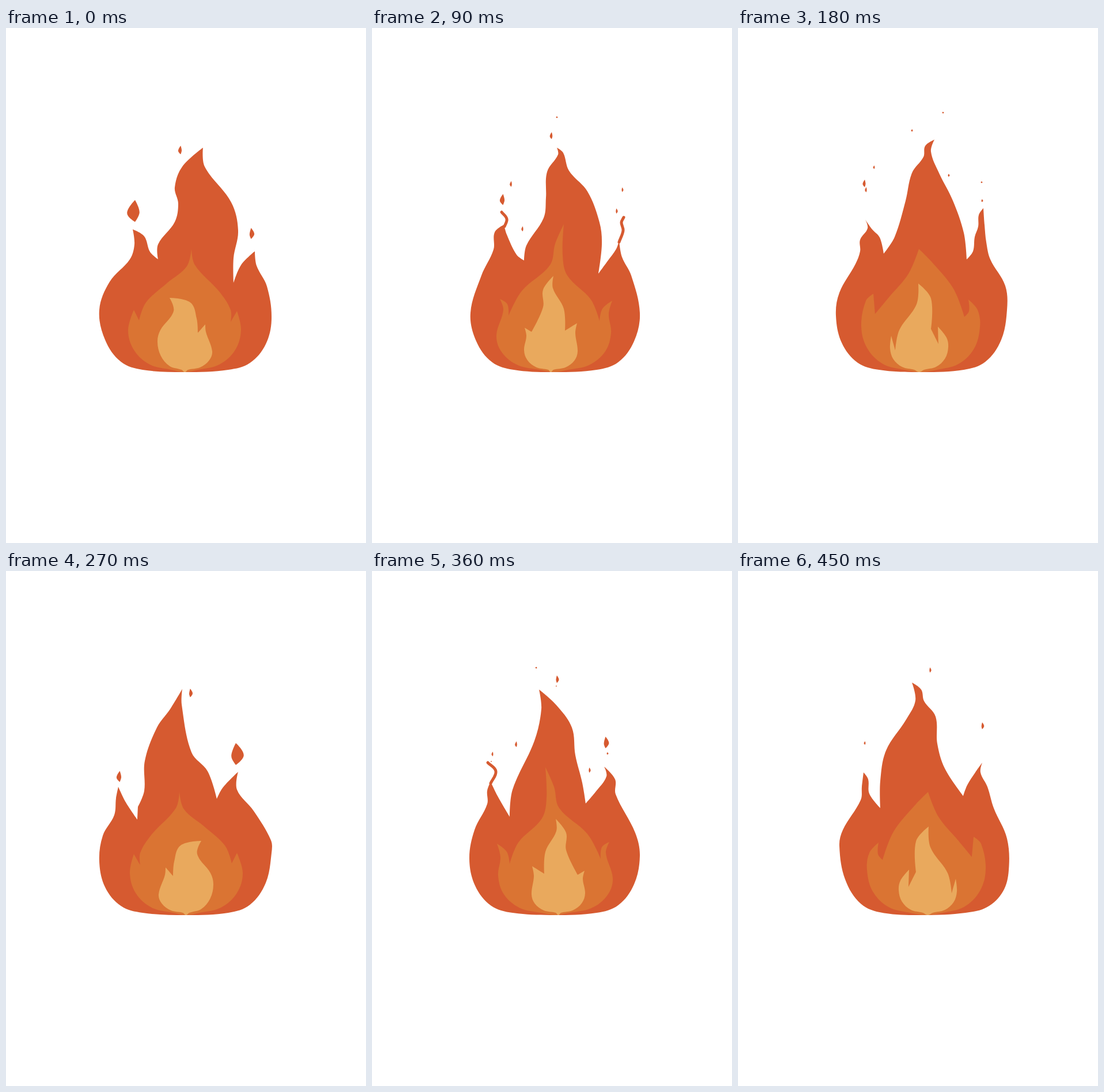
An HTML page that plays this animation: 625 by 895 pixels, repeating every 540 ms.

```html
<!DOCTYPE html>
<html lang="en">
<head>
<meta charset="utf-8">
<title>Flame</title>
<style>
html, body { margin: 0; width: 100%; height: 100%; overflow: hidden; background: #fff; }
svg { display: block; width: 100%; height: 100%; }
</style>
</head>
<body>
<svg id="stage" viewBox="0 0 625 895"></svg>
<script>
const STEP = 90;
const CENTER = 312;
const RED = '#d65a30', ORANGE = '#da7433', GOLD = '#e9a95d';

// Key points run from the left belly over the tongues to the right belly;
// * marks a sharp tip or notch. The round base is computed by bowl().
// Inner flames come back mirrored about axis / 2 after half a loop.
const inner = [
  {
    axis: 623,
    mid: '212,525 222,490* 231,508* 243,477 280,443 314,414 322,383* 328,412 371,459 390,490 390,511* 401,492* 408,525',
    core: '263,545 268,525 291,492 284,469* 320,477 331,505 333,530* 346,515* 347,528 358,562'
  },
  {
    axis: 634,
    mid: '216,535 228,490 222,471* 235,480 237,500* 260,457 309,412 318,375 333,341* 331,395 339,430 380,472 395,509* 400,488 417,474* 411,497 415,530',
    core: '264,560 268,535 265,521* 277,528* 297,485 297,455 315,431* 314,452 333,488 335,526* 356,513* 353,530 357,562'
  },
  {
    axis: 644,
    mid: '214,518 222,474 235,462* 238,497* 262,468 296,427 314,384* 335,405 374,453 393,502* 401,492 400,472* 416,490 420,520',
    core: '264,557 266,535* 273,560* 280,525 310,480 313,444* 335,470 335,523* 348,549* 347,519* 362,538 365,555'
  }
];

// Sparks are x, y, height; wisps are thin curls.
const poses = [
  {
    outer: '162,490 180,441 215,402 223,376 220,350* 240,362 250,389 264,402* 264,376 293,337 299,305 293,277 306,241 342,208* 345,241 391,303 403,352 395,400 395,443* 408,412 432,388* 435,413 453,449 461,505',
    sparks: '221,318,38 302,212,15 427,357,19'
  },
  {
    outer: '171,495 190,430 211,385 213,355 229,342* 234,359 251,394 264,404* 268,378 298,330 302,295 304,250 323,220 321,208* 332,217 342,248 374,284 395,338 399,376 393,427* 409,405 424,384 429,369* 434,398 450,430 465,495',
    sparks: '321,155,3 311,187,12 226,298,19 241,271,10 261,349,9 425,318,9 435,281,8',
    wisps: '230,345 234,332 225,320|429,372 436,352 433,338 437,329'
  },
  {
    outer: '170,500 176,460 204,410 212,388 212,368 225,348 221,333* 233,350 246,364 253,392* 272,363 291,300 302,252 322,224 325,205 341,194* 335,215 349,252 373,300 392,356 397,402* 408,388 411,363 417,345 418,325 426,313* 428,342 431,372 438,402 464,448 467,490',
    sparks: '356,147,3 302,178,4 236,242,6 219,270,13 222,281,9 366,256,5 423,268,3 424,300,5'
  },
  {
    outer: '162,505 168,460 188,424 191,395 195,375* 208,402 228,432* 229,410* 240,382 241,330 262,272 285,240 306,205* 305,232 322,315 350,348 366,396* 376,377 403,349* 401,380 430,417 460,468 461,490',
    sparks: '402,318,38 321,212,15 196,357,19'
  },
  {
    outer: '169,500 178,450 200,405 200,382 206,366* 218,391 239,427* 244,380 282,295 294,240 290,206* 320,233 347,272 353,320 365,368 371,404* 388,384 407,357 403,340* 422,362 423,388 457,455 465,495',
    sparks: '285,168,3 322,188,13 320,200,2 250,301,10 209,318,8 207,331,2 407,298,20 409,317,4 378,346,9',
    wisps: '206,369 215,348 201,333'
  },
  {
    outer: '176,478 182,450 213,398 215,375 218,350* 226,362 228,387 247,412* 247,365 257,312 292,258 308,225 302,194* 318,206 323,226 343,253 346,300 359,343 391,391* 398,372 412,350 424,333* 421,350 433,375 444,412 467,465 470,520',
    sparks: '334,172,9 425,269,12 220,299,6'
  }
];

function parse(text) {
  return text.split(' ').map(s => {
    const [x, y, h] = s.replace('*', '').split(',').map(Number);
    return { x, y, h, sharp: s.endsWith('*') };
  });
}

// Quarter ellipse from a belly point down to the ground.
function bowl(belly, dir, radius) {
  return [30, 60, 90].map(deg => {
    const a = deg * Math.PI / 180;
    return {
      x: belly.x + dir * radius * (1 - Math.cos(a)),
      y: belly.y + (594 - belly.y) * Math.sin(a)
    };
  });
}

function smooth(pts, closed) {
  const n = pts.length;
  const at = i => closed ? pts[(i + n) % n] : pts[Math.max(0, Math.min(n - 1, i))];
  const handle = (i, reach) => {
    const p = at(i), a = at(i - 1), b = at(i + 1);
    const k = p.sharp ? 0 : reach / Math.hypot(b.x - a.x, b.y - a.y);
    return `${(p.x + (b.x - a.x) * k).toFixed(1)},${(p.y + (b.y - a.y) * k).toFixed(1)}`;
  };
  let d = `M${pts[0].x},${pts[0].y}`;
  for (let i = 0; i < (closed ? n : n - 1); i++) {
    const p = at(i), q = at(i + 1);
    const reach = Math.hypot(q.x - p.x, q.y - p.y) * 0.35;
    d += `C${handle(i, reach)} ${handle(i + 1, -reach)} ${q.x},${q.y}`;
  }
  return d;
}

function flame(text, fill, radius, axis) {
  const top = parse(text), left = top[0], right = top[top.length - 1];
  const base = { x: (left.x + right.x) / 2, y: 598 };
  const pts = [...top, ...bowl(right, -1, radius), base, ...bowl(left, 1, radius).reverse()];
  const flip = axis ? ` transform="matrix(-1 0 0 1 ${axis} 0)"` : '';
  return `<path d="${smooth(pts, true)}Z" fill="${fill}"${flip}/>`;
}

// Teardrop that is plumper when larger and leans towards the middle.
function spark({ x, y, h }) {
  const w = Math.max(Math.min(h, 3), h * (0.3 + 0.007 * h)) / 2;
  const lean = (x < CENTER ? 1 : -1) * h * 0.08;
  const d = smooth([
    { x: x + lean, y: y - h / 2, sharp: true },
    { x: x + w, y: y + h * 0.05 },
    { x: x + lean, y: y + h / 2, sharp: true },
    { x: x - w, y: y + h * 0.1 }
  ], true);
  return `<path d="${d}Z" fill="${RED}"/>`;
}

function wisp(text) {
  return `<path d="${smooth(parse(text))}" fill="none" stroke="${RED}" stroke-width="5" stroke-linecap="round"/>`;
}

const stage = document.getElementById('stage');
stage.innerHTML = poses.map(({ outer, sparks, wisps }, i) => {
  const { axis, mid, core } = inner[i % 3];
  const flip = i < 3 ? 0 : axis;
  return '<g visibility="hidden">' +
    flame(outer, RED, 75) +
    parse(sparks).map(spark).join('') +
    (wisps ? wisps.split('|').map(wisp).join('') : '') +
    flame(mid, ORANGE, 75, flip) +
    flame(core, GOLD, 42, flip) + '</g>';
}).join('');
const groups = [...stage.children];

function render(time) {
  const now = Math.floor(time / STEP) % groups.length;
  groups.forEach((g, i) => g.setAttribute('visibility', i === now ? 'visible' : 'hidden'));
}

const start = performance.now();
function tick() {
  render(performance.now() - start);
  requestAnimationFrame(tick);
}
tick();
</script>
</body>
</html>
```
